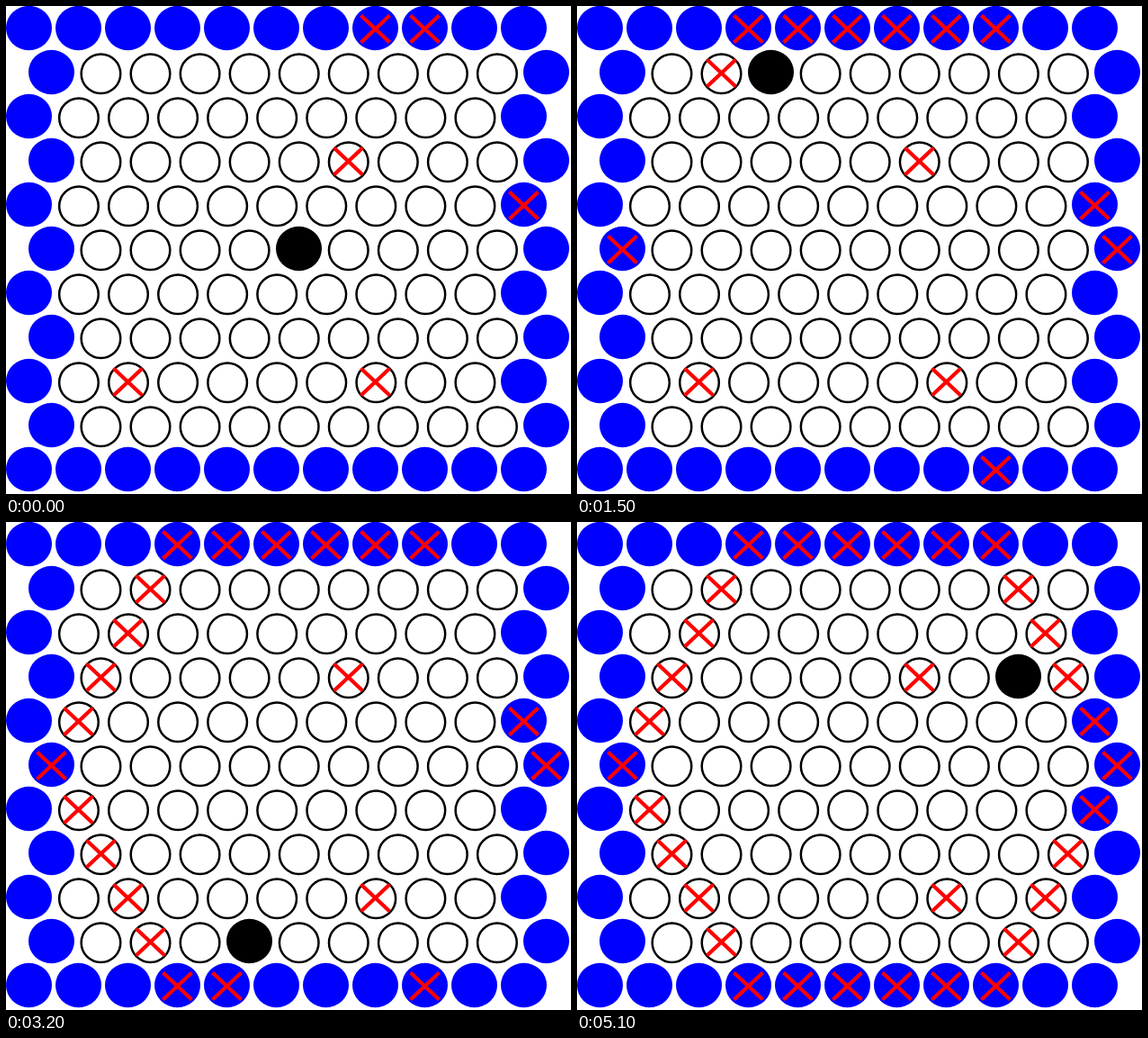
An HTML page with a canvas for the animation above (5.2 s loop, 628 by 542 pixels).

```html
<!DOCTYPE html>
<html lang="en">
<head>
<meta charset="utf-8">
<title>Hex board chase</title>
<style>
  html, body { margin: 0; width: 100%; height: 100%; overflow: hidden; background: #fff; }
  canvas { display: block; }
</style>
</head>
<body>
<canvas id="board" width="628" height="542"></canvas>
<script>
const STEP = 100, STEPS = 52, SIZE = 11;
const ctx = document.getElementById('board').getContext('2d');

// Cells are [row, column]; odd rows sit half a cell to the right.
function walk([row, col], dir) {
  if (dir === 'e') return [row, col + 1];
  if (dir === 'w') return [row, col - 1];
  const odd = row % 2;
  return [row + (dir[0] === 's' ? 1 : -1), col + (dir[1] === 'e' ? odd : odd - 1)];
}

// Follows legs such as "sw4 e2" and returns every cell passed.
function trace(start, legs) {
  const cells = [start];
  for (const [, dir, count] of legs.matchAll(/([a-z]+)(\d)/g)) {
    for (let i = 0; i < count; i++) cells.push(walk(cells[cells.length - 1], dir));
  }
  return cells;
}

const preset = [[0, 7], [0, 8], [3, 6], [4, 10], [8, 2], [8, 7]];
const corners = [[5, 0], [0, 3], [5, 10], [10, 8]];
const path = trace([5, 5], 'ne1 nw1 ne2 w3 sw4 se4 e4 ne4 nw2');

// The corners go first, then the gaps of the hexagonal wall in order.
const taken = new Set([...preset, ...corners].map(String));
const wall = trace([0, 6], 'w3 sw5 se5 e5 ne5 nw4');
const blocks = [...corners, ...wall.filter(cell => !taken.has(String(cell)))];

const cellX = (row, col) => 25.5 + 55 * col + 25 * (row % 2);
const cellY = row => 49 * row;

function disc(row, col, color) {
  ctx.fillStyle = color;
  ctx.beginPath();
  ctx.ellipse(cellX(row, col), cellY(row) + 24.5, 25.5, 24.7, 0, 0, 2 * Math.PI);
  ctx.fill();
}

function ring(row, col) {
  const x = 25.9 + 55.06 * col + 24.5 * (row % 2);
  ctx.strokeStyle = '#000';
  ctx.lineWidth = 2.5;
  ctx.beginPath();
  ctx.arc(x, cellY(row) + 26.3, 21.8, 0, 2 * Math.PI);
  ctx.stroke();
}

function cross([row, col]) {
  const x = cellX(row, col), y = cellY(row) + 25.5, w = 16, h = 15;
  ctx.strokeStyle = '#f00';
  ctx.lineWidth = 4.3;
  ctx.beginPath();
  ctx.moveTo(x - w, y - h);
  ctx.lineTo(x + w, y + h);
  ctx.moveTo(x + w, y - h);
  ctx.lineTo(x - w, y + h);
  ctx.stroke();
}

function draw(step) {
  // Turns alternate: a block on odd steps, a move on even ones.
  const [catRow, catCol] = path[Math.floor(step / 2)];
  const last = SIZE - 1;
  ctx.fillStyle = '#fff';
  ctx.fillRect(0, 0, 628, 542);
  for (let row = 0; row < SIZE; row++) {
    for (let col = 0; col < SIZE; col++) {
      const edge = row % last === 0 || col % last === 0;
      if (row === catRow && col === catCol) disc(row, col, '#000');
      else if (edge) disc(row, col, '#00f');
      else ring(row, col);
    }
  }
  preset.forEach(cross);
  blocks.slice(0, Math.ceil(step / 2)).forEach(cross);
}

let shown = -1;
const start = performance.now();
function tick() {
  const step = Math.floor((performance.now() - start) / STEP) % STEPS;
  if (step !== shown) draw(shown = step);
  requestAnimationFrame(tick);
}
tick();
</script>
</body>
</html>
```
